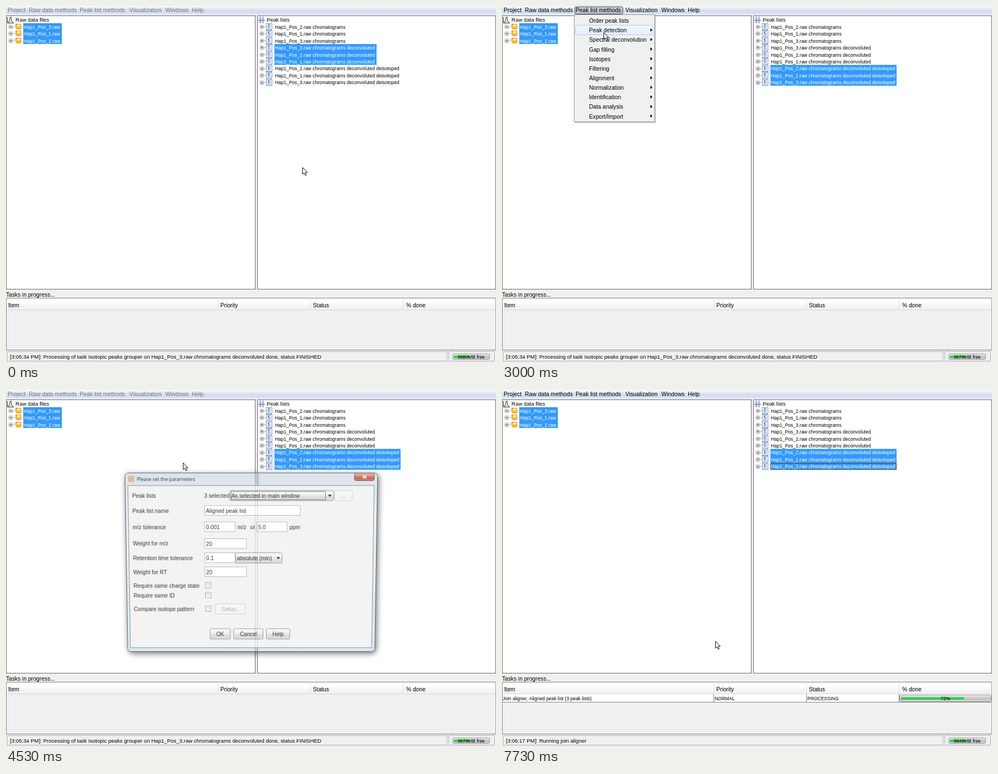
Write an HTML page with a canvas that moves like this. It is 878 px wide and 638 px high and loops after 8 s.

```html
<!DOCTYPE html>
<html lang="en">
<head>
<meta charset="utf-8">
<title>Join aligner</title>
<style>
  html, body { margin: 0; width: 100%; height: 100%; overflow: hidden; background: #f0f0f0; }
  canvas { display: block; }
</style>
</head>
<body>
<canvas id="stage" width="878" height="638"></canvas>
<script>
const W = 878, H = 638, LOOP = 8000, STEP = 1000 / 15, ROW = 12.45;
const screen2d = document.getElementById('stage').getContext('2d');
const layer = document.createElement('canvas');
layer.width = W;
layer.height = H;
const layer2d = layer.getContext('2d');
let g = screen2d;

// time, x, y, eased
const PATH = [
  [0, 531, 289], [200, 540, 240], [470, 562, 112], [600, 562, 114], [800, 548, 135],
  [1130, 546, 135], [1400, 478, 122], [1600, 361, 95], [1730, 229, 54], [1870, 176, 12],
  [2000, 172, 7], [2670, 172, 7], [3000, 182, 47], [3470, 187, 130], [3530, 187, 131],
  [3800, 187, 131], [4130, 317, 130, 1], [4670, 317, 130], [5530, 381, 441, 1],
  [6600, 381, 441], [6870, 382, 450]
];
const MEMORY = [[0, 3680], [2800, 3679], [5000, 3677], [6200, 3670], [6670, 3661], [7670, 3649]];
const DONE = [[6200, 15], [6470, 35], [6670, 42], [7070, 51], [7400, 69], [7670, 72]];
const MENU = ['Order peak lists', 'Peak detection', 'Spectral deconvolution', 'Gap filling', 'Isotopes',
  'Filtering', 'Alignment', 'Normalization', 'Identification', 'Data analysis', 'Export/Import'];
const BAR = [['Project', 3], ['Raw data methods', 41], ['Peak list methods', 132],
  ['Visualization', 221], ['Windows', 285.5], ['Help', 333]];
const COLUMNS = [['Item', 4], ['Priority', 384], ['Status', 550], ['% done', 717]];
const RAW = [3, 1, 2];
const PEAKS = [2, 1, 3, 3, 2, 1, 2, 1, 3];
const SUFFIX = ['', ' deconvoluted', ' deconvoluted deisotoped'];

function at(list, t) {
  let v = list[0][1];
  for (const [time, value] of list) if (t >= time) v = value;
  return v;
}

function pointer(t) {
  let i = PATH.length - 1;
  while (i && PATH[i][0] > t) i--;
  const a = PATH[i], b = PATH[i + 1];
  if (!b) return [a[1], a[2]];
  let u = (t - a[0]) / (b[0] - a[0]);
  if (b[3]) u = u * u * (3 - 2 * u);
  return [Math.round(a[1] + (b[1] - a[1]) * u), Math.round(a[2] + (b[2] - a[2]) * u)];
}

function fill(x, y, w, h, color) {
  g.fillStyle = color;
  g.fillRect(x, y, w, h);
}

function frame(x, y, w, h, color) {
  g.strokeStyle = color;
  g.lineWidth = 1;
  g.strokeRect(x + .5, y + .5, w - 1, h - 1);
}

function line(color, width, ...p) {
  g.strokeStyle = color;
  g.lineWidth = width;
  g.beginPath();
  for (let i = 0; i < p.length; i += 2) g.lineTo(p[i], p[i + 1]);
  g.stroke();
}

function shape(color, ...p) {
  g.fillStyle = color;
  g.beginPath();
  for (let i = 0; i < p.length; i += 2) g.lineTo(p[i], p[i + 1]);
  g.fill();
}

function shade(y, h, ...colors) {
  const grad = g.createLinearGradient(0, y, 0, y + h);
  colors.forEach((c, i) => grad.addColorStop(i / (colors.length - 1), c));
  return grad;
}

function round(x, y, w, h, r, paint, edge) {
  g.beginPath();
  g.roundRect(x + .5, y + .5, w - 1, h - 1, r);
  if (paint) { g.fillStyle = paint; g.fill(); }
  if (edge) { g.strokeStyle = edge; g.lineWidth = 1; g.stroke(); }
}

// y is the middle of the capitals; the baseline sits on a whole pixel
function text(s, x, y, size = 10.2, color = '#000', family = '"Liberation Sans", Arial, sans-serif') {
  g.font = size + 'px ' + family;
  g.fillStyle = color;
  g.fillText(s, x, Math.round(y + size * .37));
}

function centred(s, x, y, size, color) {
  g.textAlign = 'center';
  text(s, x, y, size, color);
  g.textAlign = 'left';
}

function node(x, y) {
  line('#b8b8b8', 1, x + 7, y + .5, x + 12, y + .5);
  round(x, y - 3, 7, 7, 1, '#fafafa', '#8c8c8c');
  fill(x + 2, y, 3, 1, '#334');
  fill(x + 3, y - 1, 1, 3, '#334');
}

function folder(x, y) {
  shape('#c98413', x, y - 4, x + 1, y - 5, x + 9, y - 5, x + 10, y - 4, x + 10, y + 5, x + 1, y + 5);
  fill(x + 2, y - 4, 7, 3, '#fff0c0');
  shape('#f7b52c', x, y - 1, x + 11, y - 1, x + 10, y + 5, x + 1, y + 5);
  fill(x + 2, y, 7, 1, '#ffdc7a');
}

function page(x, y) {
  fill(x, y - 6, 11, 12, '#fff');
  frame(x, y - 6, 11, 12, '#5b9bd5');
  fill(x + 3, y - 4, 2, 8, '#9fb4cf');
  for (let i = 0; i < 3; i++) fill(x + 5, y - 4 + i * 3, 3, 1, i ? '#3b5f9d' : '#d33');
  fill(x + 3, y - 3, 2, 2, '#c44');
}

function menuBar(t) {
  const live = t >= 70 && t < 4400 || t >= 6200;
  fill(0, 0, W, 16, shade(0, 16, '#fbfcfe', '#e8ecf6', '#d5dcee', '#d8e0f0', '#e4e9f5'));
  if (t >= 2000 && t < 4330)
    round(130, 1, 87, 14, 2, shade(1, 14, '#cdd2dd', '#b7bdca'), '#4c515c');
  for (const [s, x] of BAR) text(s, x, 7.3, 10.3, live ? '#000' : '#747880');
}

function panel(x, w) {
  fill(x, 17, w, 491, '#fff');
  frame(x, 17, w, 491, '#696c72');
}

function trees(t) {
  panel(0, 447);
  panel(450, 428);

  line('#222', 1, 2.5, 20, 2.5, 30.5, 14, 30.5);
  line('#222', 1, 3, 29, 6, 28, 7.5, 20, 9, 20, 10.5, 28, 13, 29);
  text('Raw data files', 17, 24.5, 9.6);
  for (const x of [455.5, 460.5]) line('#3658a8', 1, x, 19, x, 31);
  line('#3658a8', 1, 452, 25.5, 464, 25.5);
  line('#9db3e0', 1, 453, 28.5, 463, 28.5);
  text('Peak lists', 467, 24.5, 9.6);

  fill(31, 30.8, 69, ROW * 3, '#3399ff');
  RAW.forEach((n, i) => {
    const y = Math.round(37 + ROW * i);
    node(5, y);
    folder(17, y);
    text(`Hap1_Pos_${n}.raw`, 32, 37.6 + ROW * i, 8.48, '#fff');
  });

  let first = 3, last = 5, width = 183;
  if (t >= 470) { first = 6; last = t < 930 ? 6 : 8; width = 226; }
  fill(481, 30.8 + first * ROW, width, (last - first + 1) * ROW, '#3399ff');
  PEAKS.forEach((n, i) => {
    const y = Math.round(37 + ROW * i);
    node(455, y);
    page(466, y);
    text(`Hap1_Pos_${n}.raw chromatograms${SUFFIX[Math.floor(i / 3)]}`, 482, 37.6 + ROW * i, 8.48,
      i >= first && i <= last ? '#fff' : '#000');
  });
  if (t >= 470 && t < 2000 || t >= 6200)
    frame(481, Math.round(31 + last * ROW), 226, 12, '#5c432a');
}

function greenBar(x, y, w, h, len) {
  round(x, y, w, h, 2, shade(y, h, '#f4f4f4', '#d2d2d2', '#c3c3c3', '#dedede'), '#9a9a9a');
  fill(x + 3, y + h / 2 - 2, len, 4, shade(y + h / 2 - 2, 4, '#3be05a', '#05c52c'));
}

function tasks(t) {
  text('Tasks in progress...', 0, 517);
  fill(0, 524, W, 93, '#f0f0f0');
  fill(0, 524, W, 21, shade(524, 21, '#fff', '#fff', '#f3f4f6', '#f1f2f4'));
  fill(0, 544, W, 1, '#d5d5d5');
  for (const x of [379, 545, 711]) fill(x, 525, 1, 19, '#dcdee2');
  for (const [s, x] of COLUMNS) text(s, x, 536.3);
  if (t >= 6200) {
    fill(1, 545, W - 2, 14, '#fff');
    fill(0, 559, W, 1, '#858585');
    for (const x of [379, 545, 711]) fill(x, 545, 1, 14, '#858585');
    text('Join aligner, Aligned peak list (3 peak lists)', 1, 553, 8.48);
    text('NORMAL', 381, 553, 8.48);
    text('PROCESSING', 547, 553, 8.48);
    const p = at(DONE, t);
    greenBar(712, 546, 165, 13, p * 1.57);
    centred(p + '%', 794.5, 553, 8.48);
  }
  fill(0, 523, W, 1, '#80848a');
  fill(0, 616, W, 1, '#80848a');
  fill(0, 524, 1, 92, '#80848a');
  fill(W - 1, 524, 1, 92, '#a0a0a0');
}

function inset(x, w) {
  frame(x + 1, 620, w, 18, '#fff');
  frame(x, 619, w, 18, '#a6a6a6');
}

function status(t) {
  fill(0, 617, W, 21, '#f0f0f0');
  inset(2, 789);
  inset(793, 83);
  text(t < 6200
    ? '[3:05:34 PM]: Processing of task Isotopic peaks grouper on Hap1_Pos_3.raw chromatograms deconvoluted done, status FINISHED'
    : '[3:06:17 PM]: Running join aligner', 7, 628.5, 9.58);
  greenBar(800, 623, 67, 11, 28);
  centred(at(MEMORY, t) + 'MB free', 833.5, 629, 8.5);
}

function popup(x, y, w, h) {
  fill(x + 2, y + 2, w, h, 'rgba(0,0,0,.18)');
  fill(x, y, w, h, '#f0f0f0');
  frame(x, y, w, h, '#979797');
}

function hover(x, y, w) {
  round(x, y, w, 18, 2, shade(y, 18, '#f3f6fb', '#e6eef9'), '#aecff0');
}

function menus(t, mx, my) {
  if (t < 2000 || t >= 4330) return;
  const sub = t >= 3670;
  const row = sub ? 6 : my < 18 ? -1 : Math.floor((my - 18) / 17.15);
  popup(129, 15, 145, 193);
  if (row >= 0) hover(131, Math.round(17.2 + row * 17.15), 140);
  MENU.forEach((s, i) => {
    const y = 26.3 + 17.15 * i;
    text(s, 156, y);
    if (i) shape('#000', 266, y - 3.5, 269.5, y - .5, 266, y + 2.5);
  });
  if (!sub) return;
  popup(268, 118, 113, 39);
  if (mx > 270) hover(270, 120, 109);
  text('Join aligner', 294, 129.3);
  text('RANSAC aligner', 294, 146.3);
}

function button(x, y, w, h, label, state) {
  const looks = {
    off: ['#f4f4f4', '#f1f1f1', '#c2c5c8'],
    hot: ['#e6f5fd', '#a9d9f3', '#3c7fb1'],
    down: ['#d6ebf7', '#86c0e0', '#2c628b']
  };
  const [a, b, edge] = looks[state] || ['#f3f3f3', '#d2d2d2', '#808080'];
  round(x, y, w, h, 2, shade(y, h, a, a, b, b), edge);
  if (state === 'down') round(x + 1, y + 1, w - 2, h - 2, 1, null, '#4f9fca');
  centred(label, x + w / 2, y + h / 2 + .2, 10.2, state === 'off' ? '#9a9a9a' : '#000');
}

function combo(x, y, w, label) {
  button(x, y, w, 20, '');
  text(label, x + 3, y + 10);
  shape('#000', x + w - 11, y + 8.5, x + w - 4, y + 8.5, x + w - 7.5, y + 12.5);
}

function field(x, y, w, s) {
  fill(x, y, w, 19, '#fff');
  frame(x, y, w, 19, '#a5a8ac');
  text(s, x + 3, y + 9.8);
}

function dialogWindow(t) {
  const opening = t < 4670;
  const glass = opening
    ? shade(146, 330, '#d2dbe4', '#e6ebf0', '#e3e9ef', '#d3dfea', '#d8e2ec')
    : shade(146, 330, '#c4d2df', '#d6e2ed', '#b3d0ee', '#a9cdf0', '#b4d3ee');
  g.save();
  g.shadowColor = 'rgba(0,0,0,.8)';
  g.shadowBlur = 12;
  g.shadowOffsetX = 2;
  g.shadowOffsetY = 3;
  round(208, 146, 463, 330, 6, '#bcd0e3');
  g.restore();
  round(208, 146, 463, 330, 6, glass, '#28323d');
  round(209, 147, 461, 328, 5, null, '#e4f0f8');
  fill(446, 148, 8, 20, 'rgba(90,110,130,.28)');
  fill(446, 470, 8, 4, 'rgba(90,110,130,.28)');
  fill(213, 169, 452, 300, '#f0f0f0');
  frame(213, 169, 452, 300, '#66747f');

  fill(214, 152, 11, 11, '#d9a88a');
  text('Please set the parameters', 230, 157.3, 8.82, '#000', '"Open Sans", sans-serif');
  round(628, 146, 37, 15, 3, shade(146, 15, '#e3aa9d', '#d48473', '#b53c26', '#cc6a50'), '#5a2a24');
  line('#fff', 1.8, 643.5, 151, 650, 156.5);
  line('#fff', 1.8, 650, 151, 643.5, 156.5);

  const labels = [['Peak lists', 188], ['Peak list name', 216], ['m/z tolerance', 246],
    ['Weight for m/z', 276.5], ['Retention time tolerance', 303], ['Weight for RT', 329.5],
    ['Require same charge state', 354], ['Require same ID', 372], ['Compare isotope pattern', 397]];
  for (const [s, y] of labels) text(s, 221, y);

  text('3 selected', 353, 188);
  combo(400, 178, 191, 'As selected in main window');
  if (t < 5730) frame(402, 180, 174, 16, '#555');
  button(592, 178, 33, 20, '...', 'off');
  field(353, 206, 177, 'Aligned peak list');
  field(353, 236, 57, '0.001');
  text('m/z', 414, 246);
  text('or', 437.5, 246);
  field(449, 236, 57, '5.0');
  text('ppm', 510, 246);
  field(353, 267, 78, '20');
  field(353, 293, 57, '0.1');
  combo(410, 293, 87, 'absolute (min)');
  field(353, 319, 78, '20');
  for (const y of [348, 366, 391]) {
    fill(354, y, 11, 11, '#fff');
    frame(354, y, 11, 11, '#8e8f8f');
    fill(356, y + 2, 7, 7, shade(y + 2, 7, '#d6d9dc', '#f2f3f4'));
  }
  button(372, 387, 57, 20, 'Setup..', 'off');
  button(362, 433, 39, 20, 'OK', t < 5530 ? '' : t < 5730 ? 'hot' : 'down');
  button(406, 433, 56, 20, 'Cancel');
  button(467, 433, 45, 20, 'Help');
}

// Opens with a fade and a slight backward tilt
function dialog(t) {
  if (t < 4470 || t >= 6200) return;
  const q = at([[4470, 2], [4530, 1], [4600, .35], [4670, 0]], t);
  if (!q) return dialogWindow(t);
  g = layer2d;
  g.clearRect(0, 0, W, H);
  dialogWindow(t);
  g = screen2d;
  g.save();
  g.globalAlpha = at([[4470, .45], [4530, .78], [4600, .94]], t);
  const k = 1 - .028 * q;
  for (let row = 130; row < 496; row++) {
    const y = (row - 6.4 * q) / k;
    const s = 1 - q * (.023 + .017 * (y - 188) / 254);
    g.drawImage(layer, 190, y, 498, 1 / k, 439 - 249 * s, row, 498 * s, 1);
  }
  g.restore();
}

function arrow(x, y) {
  g.save();
  g.translate(x + .5, y + .5);
  g.beginPath();
  const p = [0, 0, 0, 12, 2.7, 9.5, 4.8, 14.2, 6.8, 13.3, 4.9, 8.8, 8.6, 8.8];
  for (let i = 0; i < p.length; i += 2) g.lineTo(p[i], p[i + 1]);
  g.closePath();
  g.fillStyle = '#fff';
  g.fill();
  g.strokeStyle = '#111';
  g.lineWidth = 1;
  g.stroke();
  g.restore();
}

function draw(t) {
  const [mx, my] = pointer(t);
  fill(0, 0, W, H, '#f0f0f0');
  menuBar(t);
  trees(t);
  tasks(t);
  status(t);
  menus(t, mx, my);
  dialog(t);
  arrow(mx, my);
}

const start = performance.now();
function tick() {
  const t = (performance.now() - start) % LOOP;
  const n = Math.floor((t + 4) / STEP);
  draw(Math.round(n * STEP / 10) * 10 % LOOP);
  requestAnimationFrame(tick);
}
tick();
</script>
</body>
</html>
```
